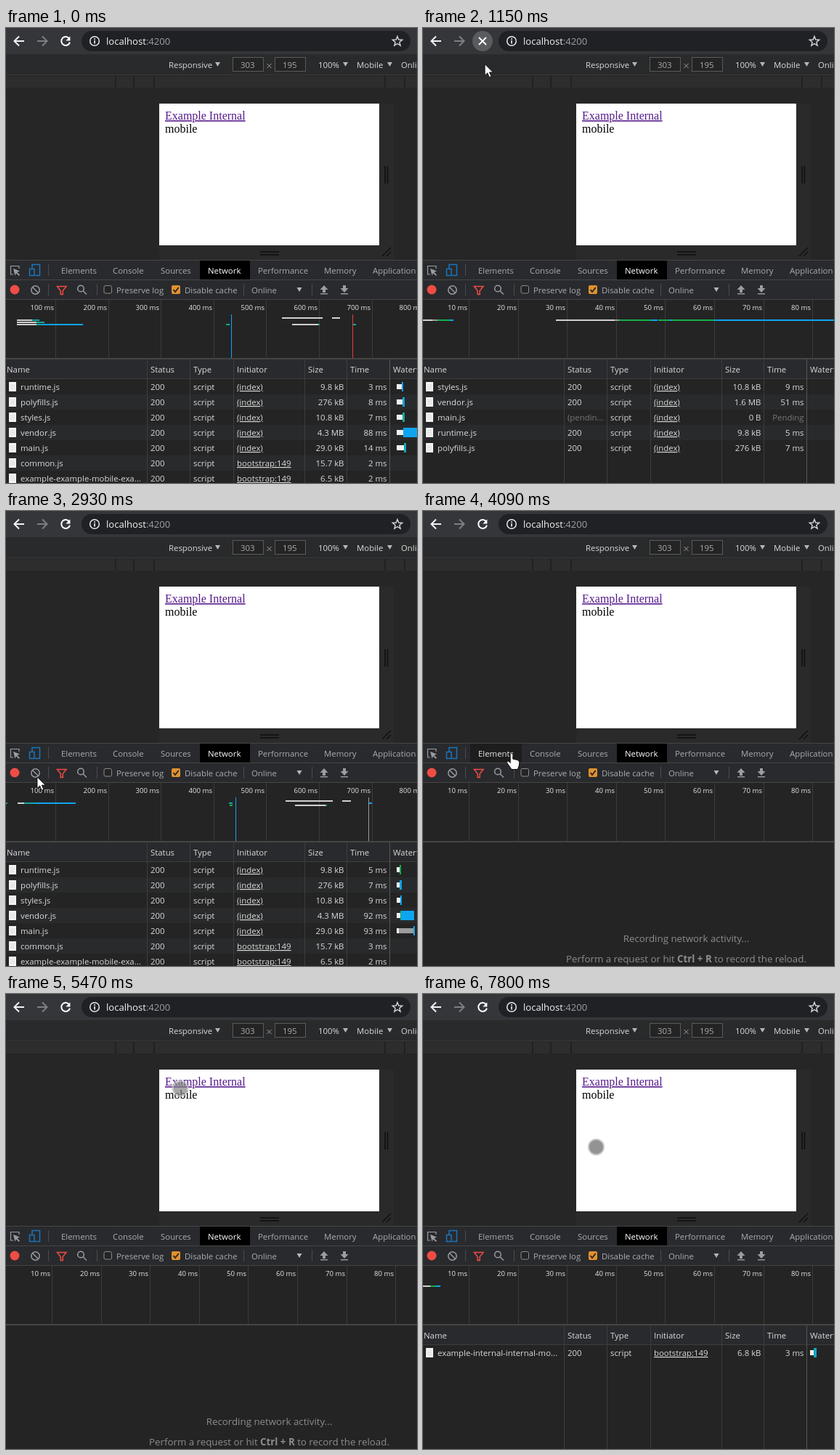
An HTML page for the animation above (8 s loop, 566 px wide and 626 px high).

```html
<!DOCTYPE html>
<html lang="en">
<head>
<meta charset="utf-8">
<title>Lazy loading in the network panel</title>
<style>
html, body { margin: 0; width: 100%; height: 100%; overflow: hidden; background: #242424; }
svg { display: block; width: 566px; height: 626px; }
text { font: 11.4px "Open Sans", "Noto Sans", sans-serif; fill: #dadada; white-space: pre; }
.url { font-size: 13.1px; fill: #9aa0a6; }
.url .host { fill: #f1f3f4; }
.tab { fill: #a9acb0; }
.tab.on { fill: #fff; }
.tick { font-size: 9.6px; fill: #e8e8e8; text-anchor: end; }
.dim { fill: #777; }
.soft { fill: #a9acb0; }
.right { text-anchor: end; }
.link { text-decoration: underline 1px; text-underline-offset: 1px; }
.hint { font-size: 13.3px; fill: #8d8d8d; text-anchor: middle; }
.hint tspan { font-weight: 700; }
.page { font: 16px "Liberation Serif", "Times New Roman", serif; fill: #000; }
.page.link { fill: #551a8b; text-underline-offset: 2px; }
.line { fill: none; stroke: #9a9da1; stroke-width: 1.5; }
</style>
</head>
<body>
<svg id="stage" viewBox="0 0 566 626"></svg>
<script>
const LOOP = 8000;
const WHITE = '#d0d0d0', GREEN = '#12b04a', TEAL = '#18a7a0', BLUE = '#0ea5f0', GREY = '#9b9b9b', RED = '#e0403a';

const rect = (x, y, w, h, fill, extra = '') =>
  `<rect x="${x}" y="${y}" width="${w}" height="${h}" fill="${fill}" ${extra}/>`;
const text = (x, y, s, cls = '') => `<text x="${x}" y="${y}" class="${cls}">${s}</text>`;
const path = (d, extra = '') => `<path d="${d}" ${extra}/>`;
const line = (d, extra = '') => path(d, `class="line" ${extra}`);
const group = (id, body, extra = '') => `<g id="${id}" ${extra}>${body}</g>`;
const down = (x, y) => path(`M${x} ${y}h7l-3.5 6z`, 'fill="#b4b6b9"');

function browserBar() {
  const reload = line('M87.2 14.5A6 6 0 1 0 88 19.6', 'style="stroke:#fff;stroke-width:2"') +
    path('M88.4 11.5v6h-6z', 'fill="#fff"');
  const stop = line('M77 13l10 10M87 13l-10 10', 'style="stroke:#fff;stroke-width:1.8"');
  const arrow = (x, dir, c) =>
    line(`M${x + 7 * dir} 18H${x - 6 * dir}M${x} 11.5l${-6.5 * dir} 6.5l${6.5 * dir} 6.5`, `style="stroke:${c};stroke-width:2"`);
  let star = '';
  for (let i = 0; i < 10; i++) {
    const a = i * Math.PI / 5 - Math.PI / 2, r = i % 2 ? 3 : 7;
    star += (i ? 'L' : 'M') + (539 + r * Math.cos(a)).toFixed(2) + ' ' + (18.5 + r * Math.sin(a)).toFixed(2);
  }
  return rect(0, 0, 566, 36, '#35363a') + rect(104, 4, 453, 28, '#202124', 'rx="14"') +
    arrow(18, 1, '#f1f3f4') + arrow(50, -1, '#7d7f83') +
    group('glow', '<circle cx="82" cy="18" r="14" fill="#5a5b5e"/>') +
    group('reload', reload) + group('stop', stop) +
    '<circle cx="122" cy="18" r="6.3" class="line" style="stroke:#e8eaed"/>' +
    path('M121.2 17h1.7v4.5h-1.7zM121.2 14.3h1.7v1.7h-1.7z', 'fill="#e8eaed"') +
    text(138, 23, '<tspan class="host">localhost</tspan>:4200<tspan id="route"></tspan>', 'url') +
    line(star + 'z', 'style="stroke:#d5d7da;stroke-width:1.4"');
}

function deviceBar() {
  const box = (x, w) => rect(x + .5, 40.5, w, 19, '#242424', 'stroke="#5a5a5a"');
  return rect(0, 36, 566, 28, '#292a2b') + rect(0, 64, 566, 1, '#3a3a3a') +
    text(224, 55, 'Responsive') + down(288, 47) +
    box(312, 42) + text(323, 55, '303', 'soft') +
    line('M359.5 49l6 6M365.5 49l-6 6', 'style="stroke-width:1"') +
    box(370, 42) + text(381, 55, '195', 'soft') +
    text(430, 55, '100%') + down(464, 47) + text(483, 55, 'Mobile') + down(525, 47) +
    text(544, 55, 'Online');
}

function viewport() {
  const marks = [151, 176, 204, 522, 549].map(x => rect(x - 1, 66, 2, 16, '#212121')).join('');
  return rect(0, 65, 566, 255, '#262626') + rect(0, 66, 566, 16, '#2d2d2d') + marks +
    rect(211, 104, 323, 215, '#2a2a2a') + rect(211, 104, 303, 195, '#fff') +
    line('M522 190v24M525.5 190v24M350 308h26M350 312h26M518 314l12-12M524 314l6-6',
      'style="stroke:#0e0e0e;stroke-width:1.4"') +
    text(219, 126, 'Example Internal', 'page link') +
    group('home', text(219, 144, 'mobile', 'page')) +
    group('internal', text(219, 160, 'internal works!', 'page') + text(219, 194, 'mobile', 'page') +
      text(219, 212, 'home', 'page link'));
}

function tabs() {
  const names = { Elements: 76, Console: 147, Sources: 213, Network: 278, Performance: 347, Memory: 438, Application: 505 };
  return rect(0, 319, 566, 28, '#292a2d') + rect(0, 319, 566, 1, '#454545') +
    rect(0, 346, 566, 1, '#454545') +
    line('M10 339H6.5V327.5H18V331', 'style="stroke-width:1.2"') +
    path('M10 331l9 3.6-3.6 1.3 3.6 3.8-1.3 1.3-3.8-3.8-1.4 3.5z', 'fill="#9a9da1"') +
    line('M36 331v-5.5h10.5v15H40M32.5 331.5h6.5v9h-6.5z', 'style="stroke:#1976bd"') +
    rect(58, 325, 1, 16, '#494c50') +
    rect(267, 320, 69, 26, '#000') +
    group('hover', rect(65, 320, 71, 26, '#1d1d1e')) +
    Object.entries(names).map(([s, x]) => text(x, 338, s, s === 'Network' ? 'tab on' : 'tab')).join('')
      .replace('class="tab"', 'class="tab" id="elements"');
}

function toolbar() {
  const sep = x => rect(x, 352, 1, 16, '#494c50');
  const grey = 'fill="#9a9da1"';
  return rect(0, 347, 566, 27, '#292a2d') + rect(0, 373, 566, 1, '#454545') +
    '<circle cx="12" cy="360" r="6.5" fill="#ef4c45"/>' +
    '<circle cx="40.5" cy="360.5" r="5.7" class="line"/>' + line('M36.5 356.5l8 8') +
    sep(58) +
    line('M70.5 355.5h12.5l-4.8 6v5h-3v-5z', 'style="stroke:#ef4c45"') +
    '<circle cx="103" cy="358.5" r="4.3" class="line"/>' + line('M106 361.5l5 5') +
    sep(125) +
    rect(135, 354.5, 10.5, 10.5, '#242424', 'rx="2" stroke="#8b8b8b"') + text(152, 365, 'Preserve log', 'soft') +
    rect(228, 354, 12, 12, '#e0912f', 'rx="2"') + line('M230.5 360l2.5 3 4.8-6', 'style="stroke:#242424;stroke-width:1.8"') +
    text(246, 365, 'Disable cache', 'soft') + sep(327) +
    text(338, 365, 'Online', 'soft') + down(400.5, 357) + sep(421) +
    path('M438 354l5.5 6h-3.5v4h-4v-4h-3.5z', grey) + rect(433, 365, 10, 1.4, '#9a9da1') +
    path('M466 364l5.5-6h-3.5v-4h-4v4h-3.5z', grey) + rect(461, 365, 10, 1.4, '#9a9da1');
}

// Overview bars are [y, start, end, colour]; a tall marker carries its own height.
function overview(first, gap, unit, bars) {
  let s = rect(0, 374, 566, 81, '#242424');
  for (let i = 0; i < 8; i++) {
    const x = Math.round(first + gap * i);
    s += rect(x, 374, 1, 81, '#3b3b3b') + text(x - 2, 388, (i + 1) * unit + ' ms', 'tick');
  }
  return s + bars.map(([y, a, b, c, h = 2]) => rect(a, y, b - a, h, c)).join('');
}
const short = bars => overview(63, 67.6, 10, bars);
const long = bars => overview(68, 72.6, 100, bars);

// Each row is [name, initiator, size, time, waterfall pieces].
function table(rows) {
  const heads = { Name: 1, Status: 199, Type: 258, Initiator: 318, Size: 416, Time: 474, Waterfall: 533 };
  let s = rect(0, 455, 566, 171, '#242424') + rect(0, 455, 566, 28, '#292a2d');
  rows.forEach(([name, by, size, time, falls], i) => {
    const y = 483 + i * 21, base = y + 15, waiting = time === 'Pending';
    s += rect(0, y, 566, 21, i % 2 ? '#292a2b' : '#242424') +
      rect(4, y + 4, 10, 13, '#f2f2f2') + line(`M6 ${y + 8}h6M6 ${y + 10.5}h6M6 ${y + 13}h6`, 'style="stroke:#d2d2d2;stroke-width:.7"') +
      text(20, base, name) + text(199, base, waiting ? '(pendin...' : '200', waiting ? 'dim' : '') +
      text(258, base, 'script') + text(318, base, by, 'link') +
      text(465.5, base, size, 'right') + text(524.5, base, time, waiting ? 'right dim' : 'right') +
      falls.map(([a, b, c, h = 13]) => rect(a, y + 10.5 - h / 2, b - a, h, c)).join('');
  });
  s += rect(0, 482, 566, 1, '#3d3d3d');
  for (const x of [194, 253, 313, 411, 469, 528]) s += rect(x, 456, 1, 170, x === 528 ? '#565656' : '#3d3d3d');
  for (const h in heads) s += text(heads[h], 474, h);
  return s + rect(0, 454, 566, 2, '#454545');
}

const wait = (a, b, c = '#f0f0f0') => [a, b, c, 7];
const INDEX = '(index)', BOOT = 'bootstrap:149';
const fullTable = (times, falls) => table([
  ['runtime.js', INDEX, '9.8 kB'], ['polyfills.js', INDEX, '276 kB'], ['styles.js', INDEX, '10.8 kB'],
  ['vendor.js', INDEX, '4.3 MB'], ['main.js', INDEX, '29.0 kB'], ['common.js', BOOT, '15.7 kB'],
  ['example-example-mobile-exa...', BOOT, '6.5 kB']
].map((r, i) => [...r, times[i] + ' ms', falls[i] || []]));

const panels = {
  before: long([
    [401, 15, 36, WHITE], [401, 36, 46, TEAL], [404, 15, 42, WHITE], [404, 42, 53, TEAL],
    [407, 15, 42, WHITE], [407, 42, 50, TEAL], [407, 50, 106, BLUE],
    [407, 303, 305, GREEN], [407, 305, 308, TEAL], [394, 310, 311, BLUE, 61],
    [398, 380, 436, WHITE], [398, 449, 460, WHITE], [407, 394, 430, WHITE], [407, 430, 432, TEAL],
    [394, 477, 478, RED, 61], [407, 478, 482, TEAL]
  ]) + fullTable([3, 8, 7, 88, 14, 2, 2], [
    [wait(538, 545), [545, 547, BLUE]], [wait(538, 546), [546, 547, TEAL], [547, 549, BLUE]],
    [wait(538, 546), [546, 549, TEAL]], [wait(538, 547), [547, 566, BLUE]],
    [wait(538, 548), [548, 549, GREEN], [549, 551, BLUE]]
  ]),
  loading: short([
    [401, 0, 13, WHITE], [401, 13, 20, GREY], [401, 20, 37, GREEN], [401, 37, 42, BLUE],
    [401, 183, 264, WHITE], [401, 264, 270, GREY], [401, 270, 314, GREEN], [401, 314, 323, BLUE],
    [401, 324, 340, GREEN], [401, 340, 343, BLUE], [401, 343, 401, GREEN], [401, 401, 566, BLUE]
  ]) + table([
    ['styles.js', INDEX, '10.8 kB', '9 ms', []], ['vendor.js', INDEX, '1.6 MB', '51 ms', []],
    ['main.js', INDEX, '0 B', 'Pending', []], ['runtime.js', INDEX, '9.8 kB', '5 ms', []],
    ['polyfills.js', INDEX, '276 kB', '7 ms', []]
  ]),
  after: long([
    [401, 0, 2, GREEN], [401, 16, 25, WHITE], [401, 25, 40, TEAL], [401, 40, 96, BLUE],
    [401, 307, 312, TEAL], [404, 308, 312, GREEN], [394, 316, 317, BLUE, 61],
    [398, 385, 450, WHITE], [398, 463, 475, WHITE], [404, 398, 440, WHITE], [404, 440, 442, TEAL],
    [394, 499, 500, GREY, 61], [401, 500, 504, BLUE]
  ]) + fullTable([5, 7, 9, 92, 93, 3, 2], [
    [wait(538, 542), [542, 544, GREEN]], [wait(538, 542), [542, 545, BLUE]],
    [wait(538, 543), [543, 545, BLUE]], [wait(538, 543), [543, 544, GREEN], [544, 562, BLUE]],
    [wait(538, 541), wait(541, 561, GREY), [561, 563, BLUE]]
  ]),
  empty: short([]) + rect(0, 455, 566, 171, '#242424') + rect(0, 454, 566, 2, '#454545') +
    text(362.5, 593, 'Recording network activity...', 'hint') +
    text(362.5, 621, 'Perform a request or hit <tspan>Ctrl + R</tspan> to record the reload.', 'hint'),
  lazy: short([[401, 0, 10, WHITE], [401, 10, 18, GREEN], [401, 18, 24, BLUE]]) +
    table([['example-internal-internal-mo...', BOOT, '6.8 kB', '3 ms', [wait(533, 538), [538, 540, TEAL], [540, 542, BLUE]]]])
};

const pointers =
  group('arrow', path('M0 0v15.5l3.6-3.4 2.6 5.9 2.6-1.1-2.6-5.7h5z', 'fill="#fff" stroke="#000" stroke-width=".8"')) +
  group('hand', path('M-1.8 0c0-2.2 3.6-2.2 3.6 0v6.2l6 1.3q3.2.8 3 4l-.7 4.5-1.8 4.5h-8.3l-5.5-8c-2-3 .6-4.3 2.2-2.6l1.5 1.7z',
    'fill="#fff" stroke="#000" stroke-width=".9"')) +
  group('touch', '<circle r="10.5" fill="#808080" fill-opacity=".85" stroke="#c4c4c4" stroke-opacity=".9" stroke-width="2"/>');

document.getElementById('stage').innerHTML = browserBar() + deviceBar() + viewport() + tabs() + toolbar() +
  Object.entries(panels).map(([id, s]) => group(id, s)).join('') + pointers;

const moves = [
  [70, -12, 300], [400, 32, 190], [760, 79, 34], [840, 81, 16], [1070, 81, 17], [1150, 85, 49], [1300, 117, 160],
  [1920, 117, 160], [2000, 122, 177], [2300, 92, 280], [2620, 44, 364], [2850, 44, 364], [2930, 43, 366],
  [3390, 43, 366], [3540, 40, 362], [3860, 40, 362], [4010, 48, 368], [4090, 122, 335], [4160, 122, 335],
  [4250, 190, 290], [4400, 259, 215], [4550, 258, 120], [4780, 192, 280], [5170, 192, 280], [5240, 214, 230],
  [5320, 230, 165], [5470, 240, 130], [5640, 240, 130], [5700, 246, 128], [5790, 249, 124], [6250, 249, 123],
  [6330, 248.5, 127], [6560, 248.5, 127], [7020, 245, 226], [7180, 245, 226], [7340, 239, 211], [7480, 238.5, 210.5], [8000, 238.5, 210.5]
];
const screens = [[0, 'before'], [1000, 'empty'], [1070, 'loading'], [1530, 'after'], [3690, 'empty'], [6330, 'lazy']];

const $ = id => document.getElementById(id);
const show = (id, on) => $(id).setAttribute('display', on ? 'inline' : 'none');
const between = (v, a, b) => v >= a && v < b;

function position(t) {
  const i = moves.findIndex(m => m[0] > t);
  if (i < 1) return [-50, -50];
  const [t0, x0, y0] = moves[i - 1], [t1, x1, y1] = moves[i], k = (t - t0) / (t1 - t0);
  return [x0 + (x1 - x0) * k, y0 + (y1 - y0) * k];
}

function draw(t) {
  const [x, y] = position(t);
  const inPage = between(x, 211, 514) && between(y, 104, 299);
  const onTab = between(x, 65, 136) && between(y, 320, 347);
  const kind = inPage ? 'touch' : onTab ? 'hand' : 'arrow';
  for (const id of ['arrow', 'hand', 'touch']) show(id, id === kind);
  $(kind).setAttribute('transform', `translate(${x.toFixed(1)} ${y.toFixed(1)})`);
  $('touch').setAttribute('opacity', between(t, 5240, 5640) ? .8 : 1);
  show('hover', onTab);
  $('elements').style.fill = onTab ? '#e8e8e8' : '';

  const screen = screens.filter(s => s[0] <= t).pop()[1];
  for (const id in panels) show(id, id === screen);

  const busy = between(t, 1000, 1690), visiting = between(t, 6330, 7720);
  show('glow', between(t, 840, 1230));
  show('stop', busy);
  show('reload', !busy);
  show('home', !visiting);
  show('internal', visiting);
  $('route').textContent = visiting ? '/internal' : '';
}

function tick() {
  draw(performance.now() % LOOP);
  requestAnimationFrame(tick);
}
tick();
</script>
</body>
</html>
```
